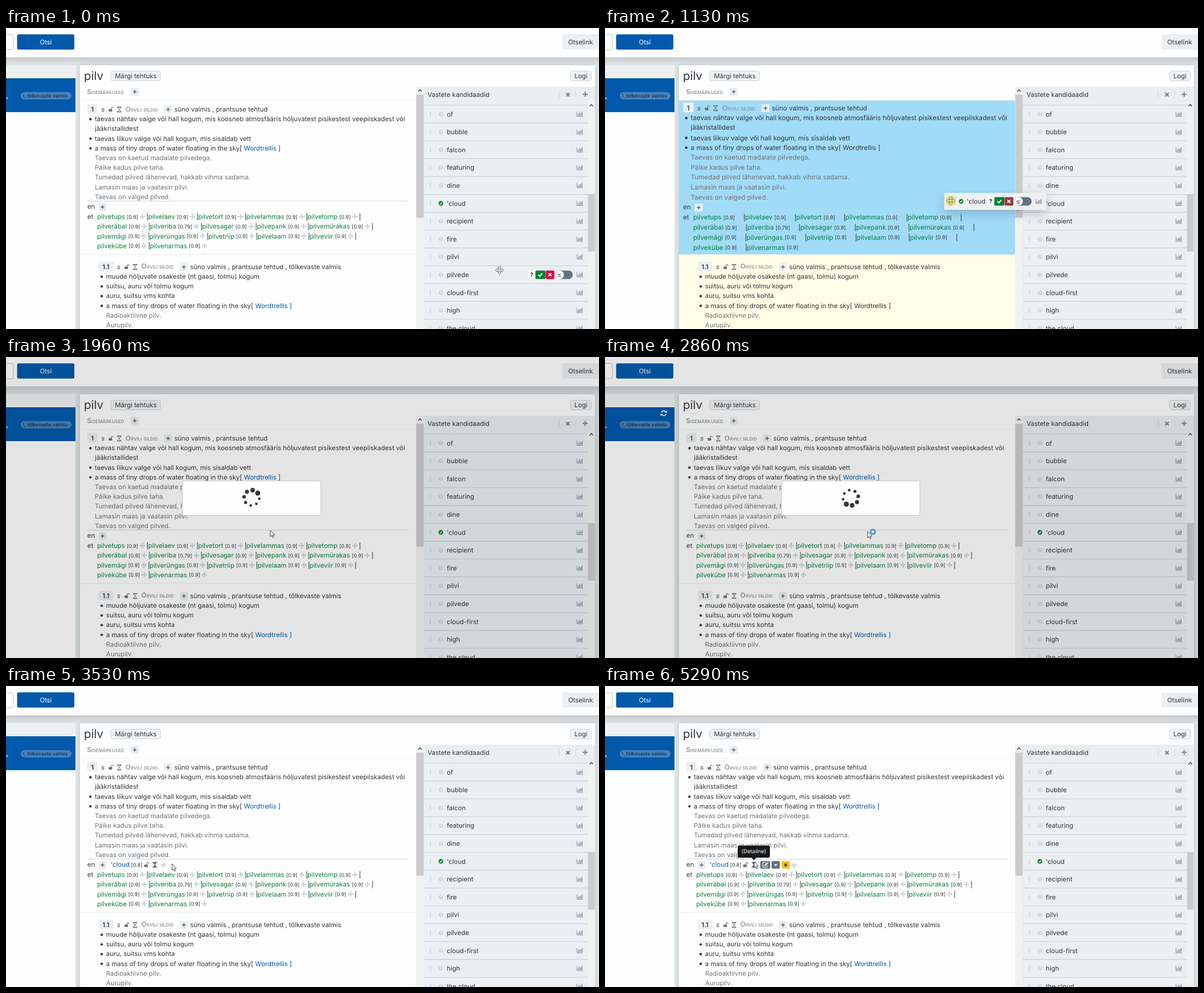
These frames come from a looping animation (1050x533 px, 5770 ms). An HTML page with a canvas:

```html
<!DOCTYPE html>
<html lang="et">
<head>
<meta charset="utf-8">
<title>Vastete kandidaadid</title>
<style>
html, body { margin: 0; width: 100%; height: 100%; overflow: hidden; background: #e1e6e8; }
canvas { display: block; }
</style>
</head>
<body>
<canvas id="stage" width="1050" height="533"></canvas>
<script>
const c = document.getElementById('stage').getContext('2d');
const LOOP = 5770, RAD = Math.PI / 180;
const INK = '#33373c', GREY = '#70757a', BLUE = '#0059ab', GREEN = '#0b8042', RED = '#e4003a',
  SOFT = '#eceff1', LINE = '#c8d5db', SLATE = '#81919c', FAINT = '#b3c6cf';

// ---- basic helpers ----
function text(s, x, y, color = INK, size = 11.47, style = '400', align = 'left') {
  c.font = `${style} ${size}px Inter, sans-serif`;
  c.letterSpacing = `${-0.001 * size}px`;
  c.textRendering = 'geometricPrecision';
  c.textAlign = align;
  c.fillStyle = color;
  c.fillText(s, x, Math.round(y + size * 0.36));
  return c.measureText(s).width;
}
function rect(x, y, w, h, color) {
  c.fillStyle = color;
  c.fillRect(x, y, w, h);
}
function box(x, y, w, h, r, fill, border) {
  c.beginPath();
  c.roundRect(x, y, w, h, r);
  c.fillStyle = fill;
  c.fill();
  if (border) { c.strokeStyle = border; c.lineWidth = 1; c.stroke(); }
}
function disc(x, y, r, color) {
  c.beginPath();
  c.arc(x, y, r, 0, 7);
  c.fillStyle = color;
  c.fill();
}
function shape(points, fill) {
  c.beginPath();
  points.forEach(([x, y]) => c.lineTo(x, y));
  c.closePath();
  c.fillStyle = fill;
  c.fill();
}
function stroke(points, color, width) {
  c.beginPath();
  points.forEach(([x, y]) => c.lineTo(x, y));
  c.strokeStyle = color;
  c.lineWidth = width;
  c.stroke();
}
function at(x, y, draw, angle = 0) {
  c.save();
  c.translate(x, y);
  c.rotate(angle);
  draw();
  c.restore();
}
// keys: [time, x, y]
function along(keys, t) {
  const i = keys.findIndex(k => k[0] > t);
  if (i < 0) return keys.at(-1).slice(1);
  if (i === 0) return keys[0].slice(1);
  const [t0, x0, y0] = keys[i - 1], [t1, x1, y1] = keys[i];
  const k = (t - t0) / (t1 - t0);
  return [x0 + (x1 - x0) * k, y0 + (y1 - y0) * k];
}

// ---- icons ----
function cross(x, y, r, color, width) {
  stroke([[x - r, y - r], [x + r, y + r]], color, width);
  stroke([[x - r, y + r], [x + r, y - r]], color, width);
}
function plus(x, y, r, color, width) {
  stroke([[x - r, y], [x + r, y]], color, width);
  stroke([[x, y - r], [x, y + r]], color, width);
}
function plusButton(x, y) {
  box(x - 7, y - 7, 14, 14, 2, '#e9eef0');
  plus(x, y, 3.2, '#5d6d79', 1.6);
}
function check(x, y, r) {
  stroke([[x - r, y], [x - r * 0.25, y + r * 0.75], [x + r, y - r * 0.7]], '#fff', r * 0.6);
}
function checkDisc(x, y) {
  disc(x, y, 4.2, '#10803a');
  check(x, y, 2.1);
}
function move(x, y, color = FAINT) {
  plus(x, y, 4, color, 1.2);
  for (let i = 0; i < 4; i++)
    at(x, y, () => shape([[4.8, 0], [2.8, -1.9], [2.8, 1.9]], color), i * 90 * RAD);
}
function unlock(x, y) {
  rect(x - 4.2, y - 0.3, 6.2, 4.4, '#6d7277');
  c.beginPath();
  c.arc(x + 2.2, y - 1.7, 1.9, Math.PI, 0);
  c.strokeStyle = '#6d7277';
  c.lineWidth = 1.1;
  c.stroke();
  stroke([[x + 0.3, y - 1.7], [x + 0.3, y]], '#6d7277', 1.1);
}
function hourglass(x, y, solid) {
  const color = '#666b70';
  rect(x - 4, y - 5, 8, 1.3, color);
  rect(x - 4, y + 3.7, 8, 1.3, color);
  const body = [[x - 3, y - 4], [x + 3, y - 4], [x - 3, y + 4], [x + 3, y + 4], [x - 3, y - 4]];
  if (solid) shape(body, color);
  stroke(body, color, 0.9);
}
function chart(x, y) {
  stroke([[x - 5, y - 4.5], [x - 5, y + 4], [x + 5.5, y + 4]], SLATE, 1);
  [3, 5.5, 4.2, 7].forEach((h, i) => rect(x - 3.3 + i * 2.2, y + 2.8 - h, 1.4, h, SLATE));
}
function grip(x, y) {
  [-3, 0, 3].forEach(d => disc(x, y + d, 0.9, '#b2c0c7'));
}
function refresh(angle) {
  at(104, 99.5, () => {
    for (let i = 0; i < 2; i++) {
      c.rotate(Math.PI);
      c.beginPath();
      c.arc(0, 0, 4.2, 0.3, 2.5);
      c.strokeStyle = '#fff';
      c.lineWidth = 1.7;
      c.stroke();
      shape([[-5.8, 0.2], [-1.2, 2], [-5.4, 5]], '#fff');
    }
  }, angle);
}

// ---- cursors ----
function arrow(x, y) {
  const p = [[0, 0], [0, 11.2], [2.6, 8.8], [4.5, 12.8], [6.2, 12], [4.4, 8.2], [7.8, 8.1]];
  at(x, y, () => {
    shape(p, '#fff');
    stroke([...p, p[0]], '#2f3133', 0.9);
  });
}
function fourWay(x, y) {
  const arm = [[1.2, -1.2], [4, -1.2], [4, -3], [7.5, 0], [4, 3], [4, 1.2], [1.2, 1.2]];
  for (let i = 0; i < 4; i++) at(x, y, () => {
    shape(arm, 'rgba(255,255,255,.75)');
    stroke(arm, '#60615c', 0.9);
  }, i * 90 * RAD);
}

// ---- page parts ----
function frame() {
  rect(0, 0, 1050, 533, '#e1e6e8');
  const g = c.createLinearGradient(0, 52, 0, 66);
  g.addColorStop(0, '#c6cacc');
  g.addColorStop(1, '#e1e6e8');
  rect(0, 52, 1050, 14, g);
  rect(0, 0, 1050, 52, '#fefefe');
  box(-12, 11.5, 25, 27, 3, '#fff', '#b9c0c5');
  box(19.7, 11.3, 101.3, 27, 3, BLUE);
  text('Otsi', 70.5, 25, '#fff', 11.47, '400', 'center');
  box(985, 11.3, 80, 27, 3, SOFT);
  text('Otselink', 995.5, 25);

  rect(0, 66, 123, 23, '#eef1f2');
  rect(0, 89, 123, 60, BLUE);
  rect(0, 149, 123, 384, '#fefefe');
  text(',', 0, 120, '#fff', 11.47, '700');
  box(26, 113.5, 90, 13, 6.5, '#4a82bb');
  text('!, tõlkevaste valmis', 30, 120, '#12385f', 8.6, '600');

  c.save();
  c.shadowColor = 'rgba(90,105,115,.28)';
  c.shadowBlur = 8;
  box(131, 66, 912, 480, 2, '#fefefe');
  c.restore();
  text('pilv', 138, 84.5, INK, 20.7);
  box(185.5, 76.5, 88, 17, 3, '#f0f3f4', '#ccd3d7');
  text('Märgi tehtuks', 193, 85);
  box(999.5, 76.5, 37, 17, 3, '#f0f3f4', '#ccd3d7');
  text('Logi', 1006.5, 85);
  text('Sisemärkused', 143.5, 112.5, '#8f9ba3', 11.9, 'small-caps 600');
  plusButton(228, 113);
}

function sense(x, y, number, badge, tags, lines, examples, plain) {
  box(x, y - 9, badge, 17, 2, '#ebeff1');
  text(number, x + badge / 2, y, INK, 11.47, '600', 'center');
  const r = x + badge;
  text('s', r + 6.5, y, '#5c6166', 11.47, 'italic 500');
  unlock(r + 24, y);
  hourglass(r + 38.5, y + 0.5);
  text('Orvili sildid', r + 49.5, y - 0.5, '#8f9ba3', 11.9, 'small-caps 600');
  plusButton(r + 125, y + 0.5);
  text(tags, r + 136, y);
  let ly = y + 17.2;
  for (const [s, wrapped] of lines) {
    if (!wrapped) disc(x + 5.5, ly + 0.5, 2.2, INK);
    const [head, link] = s.split('@');
    let tx = x + 13.3 + text(head, x + 13.3, ly);
    if (link) {
      tx += text(link, tx, ly, plain ? INK : BLUE);
      text(' ]', tx, ly, plain ? INK : BLUE);
    }
    ly += 17.2;
  }
  for (const s of examples) {
    text(s, x + 13.3, ly, GREY);
    ly += 17.2;
  }
}

const GLOSS = ['a mass of tiny drops of water floating in the sky[ @Wordtrellis'];
const WORDS = [
  'pilvetups pilvelaev pilvetort pilvelammas pilvetomp',
  'pilveräbal pilveriba pilvesagar pilvepank pilvemürakas',
  'pilvemägi pilverüngas pilvetriip pilvelaam pilveviir',
  'pilvekübe pilvenarmas'
];

function matches(iconColor) {
  WORDS.forEach((row, r) => {
    const y = 334 + r * 17.2;
    let x = 161.5;
    for (const w of row.split(' ')) {
      x += text(w, x, y, GREEN) + 3.2;
      x += text(w === 'pilveriba' ? '[0.79]' : '[0.9]', x, y + 0.5, INK, 9) + 7.6;
      move(x, y, iconColor);
      x += 8.9;
      if (w !== 'pilvenarmas') rect(x - 0.5, y - 6, 1.1, 13, '#4a4642');
      x += 1.3;
    }
  });
}

function newMatch(hover) {
  text("'cloud", 185.5, 316, BLUE);
  text('[0.8]', 221.5, 316.5, INK, 9);
  unlock(249, 316.5);
  hourglass(263.5, 316.5, true);
  move(hover ? 335 : 279, 317);
  if (!hover) return;
  box(275, 310, 17.5, 13.5, 2, '#68717a');
  box(295, 310, 14.5, 13.5, 2, '#68717a');
  box(313, 310, 14.5, 13.5, 2, '#ffc107');
  stroke([[285, 312.5], [279.5, 312.5], [279.5, 321], [287, 321], [287, 318]], '#fff', 1.1);
  stroke([[282.5, 318.5], [289, 312.3]], '#fff', 2);
  shape([[299, 315.5], [305.5, 315.5], [302.2, 319]], '#fff');
  cross(320, 317, 2.3, '#33373c', 1.7);
}

function article(drag, over, added, hover) {
  c.save();
  c.beginPath();
  c.rect(131, 128, 595, 405);
  c.clip();
  if (drag) {
    rect(131, 128, 595, 273, over ? '#a0dbf8' : '#fffee6');
    rect(131, 401, 595, 132, '#fffee6');
  }
  rect(131, 127.5, 595, 1, '#e4e9eb');
  if (!drag) rect(131, 400.5, 595, 1, '#e8ecee');
  sense(164, 422.7, '1.1', 26, 'süno valmis , prantsuse tehtud , tõlkevaste valmis', [
    ['muude hõljuvate osakeste (nt gaasi, tolmu) kogum'],
    ['suitsu, auru või tolmu kogum'],
    ['auru, suitsu vms kohta'],
    GLOSS
  ], ['Radioaktiivne pilv.', 'Aurupilv.'], drag);
  if (over) {
    c.translate(429, 264);
    c.scale(1.02, 1.02);
    c.translate(-429, -264);
  }
  sense(144, 143.8, '1', 18, 'süno valmis , prantsuse tehtud', [
    ['taevas nähtav valge või hall kogum, mis koosneb atmosfääris hõljuvatest pisikestest veepiiskadest või'],
    ['jääkristallidest', true],
    ['taevas liikuv valge või hall kogum, mis sisaldab vett'],
    GLOSS
  ], [
    'Taevas on kaetud madalate pilvedega.',
    'Päike kadus pilve taha.',
    'Tumedad pilved lähenevad, hakkab vihma sadama.',
    'Lamasin maas ja vaatasin pilvi.',
    'Taevas on valged pilved.'
  ], drag);
  rect(144, 306, 569, 1, '#cbd6da');
  text('en', 144, 316);
  plusButton(171, 317);
  text('et', 144, 334);
  matches(over ? '#afd3e6' : FAINT);
  if (added) newMatch(hover);
  c.restore();
}

function controls(x, y, pressed) {
  box(x, y - 7.5, 12.5, 15, 2, '#f8f9fa');
  text('?', x + 6.3, y, '#22262a', 9.5, '700', 'center');
  box(x + 13, y - 7.5, 17.5, 15, 2, '#07802f');
  check(x + 21.7, y, 3.5);
  box(x + 31, y - 7.5, 15.5, 15, 2, pressed ? '#a3333a' : RED);
  cross(x + 38.7, y, 2.6, '#fff', 2);
  box(x + 49.5, y - 7.5, 29.5, 15, 7.5, '#63717f');
  disc(x + 56, y, 7.4, '#f6f8f9');
  text('≤', x + 55.2, y, '#4b545c', 11.47, '400', 'center');
}

function scrollbar(x, top, w, thumb, size) {
  rect(x, top, w, 533 - top, '#f0f1f1');
  const m = x + w / 2;
  stroke([[m - 3, top + 8.5], [m, top + 5.5], [m + 3, top + 8.5]], '#4c5054', 1.6);
  rect(x + 0.5, thumb, w - 1, size, '#cbcccd');
}

const ITEMS = ['of', 'bubble', 'falcon', 'featuring', 'dine', "'cloud", 'recipient', 'fire',
  'pilvi', 'pilvede', 'cloud-first', 'high', 'the cloud'];
const TOP = 136.7, PITCH = 31.6;

function candidates(active) {
  scrollbar(726, 104, 14, 118, 218);
  rect(740, 104, 303, 429, '#e9eef0');
  text('Vastete kandidaadid', 746.5, 117.5);
  rect(979, 112, 1, 12, '#cbd7dc');
  rect(1008, 112, 1, 12, '#cbd7dc');
  cross(995, 118, 3, '#748592', 2.1);
  plus(1025.5, 117.5, 4.5, '#748592', 2);
  rect(740, TOP - 0.7, 290, 1.4, LINE);
  ITEMS.forEach((s, i) => {
    const y = TOP + PITCH * i, m = y + 15.8;
    rect(741, y + 0.7, 289, PITCH - 1.4, '#ebeff1');
    rect(740, y + PITCH - 0.7, 290, 1.4, LINE);
    grip(751.5, m);
    if (i === 5) checkDisc(770, m);
    else {
      disc(770, m, 4, '#ccd9de');
      text('?', 770, m, '#f4f7f8', 6.5, '700', 'center');
    }
    text(s, 780.5, m);
    if (i === active) controls(924.5, m);
    chart(1016, m);
  });
  scrollbar(1030, 130, 13, 294, 102);
}

function card(x, y, pressed) {
  c.save();
  c.shadowColor = 'rgba(50,70,85,.28)';
  c.shadowBlur = 18;
  c.shadowOffsetY = 6;
  box(x, y, 181, 30, 1, '#ecf0f2');
  c.restore();
  const m = y + 15;
  grip(x + 11, m);
  checkDisc(x + 30, m);
  text("'cloud", x + 40, m);
  controls(x + 76, m, pressed);
  chart(x + 167.5, m);
}

function loader(t) {
  rect(0, 0, 1050, 533, 'rgba(0,0,0,.1)');
  box(312.5, 219.5, 245, 61, 3, '#fefefe', '#c3c6c8');
  const lead = (-38 + (t - 1960) * 0.18) * RAD;
  for (let i = 0; i < 8; i++) {
    const a = lead - i * 45 * RAD;
    disc(435 + 13.6 * Math.cos(a), 249.3 + 13.6 * Math.sin(a), 4.5 - Math.min(i, 5) * 0.43, '#34383c');
  }
}

function tooltip() {
  box(235, 282.5, 57, 21.5, 3, '#17191b');
  shape([[259.5, 304], [268, 304], [263.7, 308.5]], '#17191b');
  text('(Detailne)', 263.5, 293, '#fff', 9.6, '400', 'center');
}

// ---- motion ----
const POINTER = [
  [160, 874, 429], [300, 858, 390], [440, 834, 340], [530, 826, 321], [1065, 826, 321],
  [1130, 613, 306], [1280, 512, 306], [1640, 468, 307], [2310, 468, 307], [2860, 465, 309],
  [2930, 463, 310], [3200, 390, 317], [3530, 294, 315], [3770, 294, 315], [4000, 264, 317],
  [4390, 172, 320], [4480, 172, 320], [4900, 250, 317], [5100, 262, 312], [5290, 264, 311]
];
const CARD = [[1065, 741, 295], [1130, 601.5, 292], [1300, 428, 281], [1640, 382, 282]];

function draw(now) {
  const t = now % LOOP;
  const [x, y] = along(POINTER, t);
  const drag = t >= 1080 && t < 1960;
  const loading = t >= 1960 && t < 3530;
  const hover = t >= 3830 && x < 285;
  const active = t < 1080 ? Math.floor((y - TOP) / PITCH) : -1;

  c.clearRect(0, 0, 1050, 533);
  frame();
  article(drag, drag && x < 726, t >= 3530, hover);
  candidates(active);
  if (drag) card(...along(CARD, t), t < 1220);
  if (loading) {
    if (t >= 2310) refresh((t - 2860) * 0.18 * RAD);
    loader(t);
  }
  if (hover && x > 257 && x < 271) tooltip();

  if (t < 1700) {
    if (t >= 880) disc(x, y, 9.7, 'rgba(242,218,88,.8)');
    fourWay(x, y);
  } else arrow(x, y);
  if (loading && t >= 2310) {
    c.beginPath();
    c.arc(x + 9.3, y + 0.5, 4, 0, 7);
    c.strokeStyle = '#2d97df';
    c.lineWidth = 2.6;
    c.stroke();
  }
  requestAnimationFrame(() => draw(performance.now() - start));
}
const start = performance.now();
draw(0);
</script>
</body>
</html>
```
